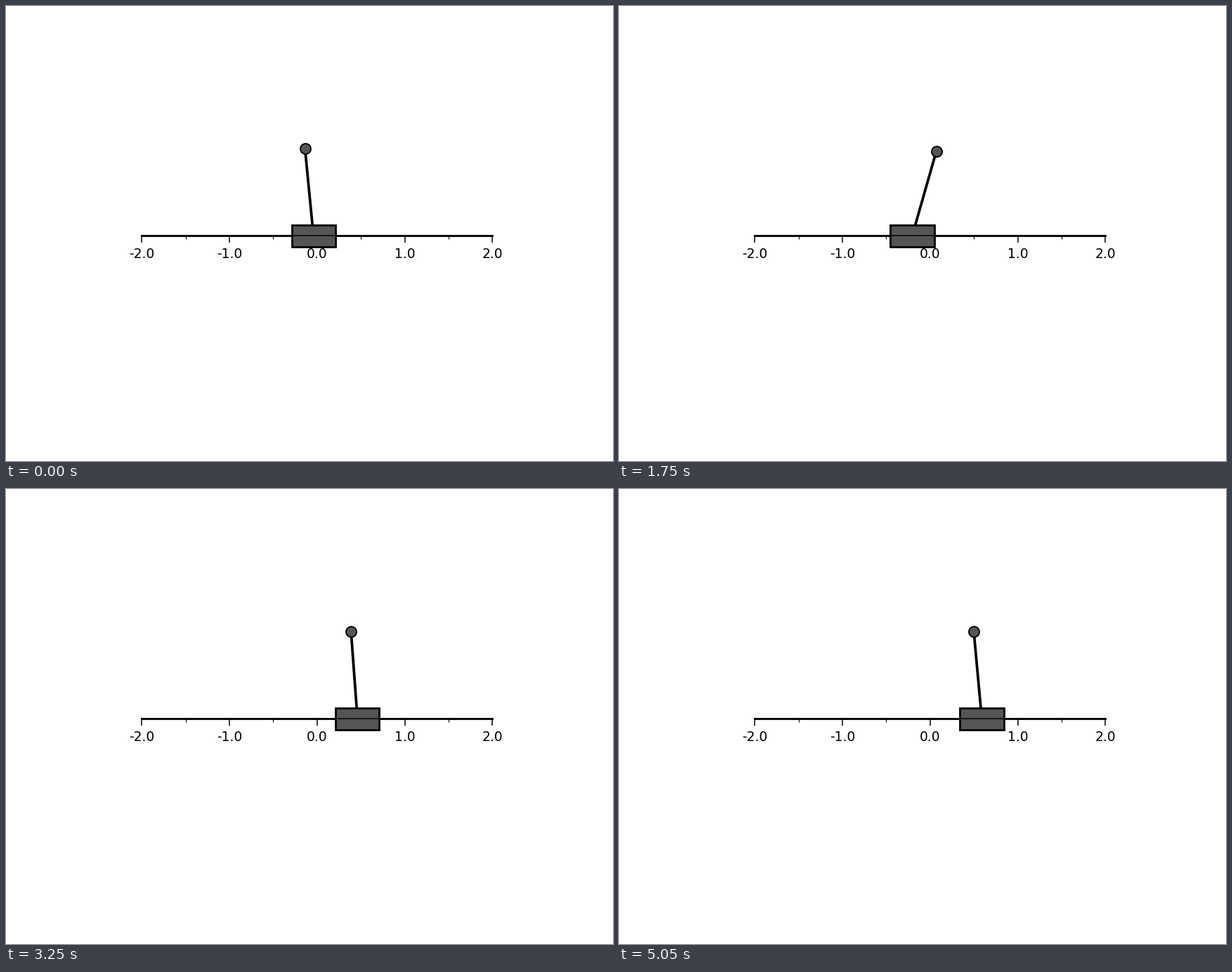
Animation, 864 px wide and 648 px high, one loop 5100 ms. Source, as a matplotlib script:

```python
import numpy as np
import matplotlib.pyplot as plt
from matplotlib.animation import FuncAnimation
from matplotlib.patches import Rectangle
from matplotlib.ticker import MultipleLocator

FRAMES, STEP_MS = 102, 50
CART_W, CART_H = 0.5, 0.25
GREY = "#555555"

# Turning points of the cart: (step, position)
CART = np.array([
    (0, -.041), (4, -.223), (7, -.071), (11, -.191), (14, -.080),
    (17, -.183), (20, -.087), (23, -.191), (26, -.064), (29, -.175),
    (32, .000), (36, -.239), (42, .273), (46, .098), (50, .314),
    (53, .178), (57, .451), (60, .258), (64, .497), (68, .250),
    (72, .483), (76, .278), (80, .521), (84, .274), (89, .519),
    (94, .158), (100, .609), (105, .412),
])

# Slow drift that the bob follows
DRIFT = np.array([
    (0, -.124), (14, -.121), (26, -.086), (43, .153),
    (65, .398), (81, .434), (101, .512),
])
SLOPES = np.gradient(DRIFT[:, 1], DRIFT[:, 0])


def segment(keys, i):
    """Index of the key before step i, span to the next, and progress."""
    k = np.clip(np.searchsorted(keys[:, 0], i, "right") - 1, 0, len(keys) - 2)
    span = keys[k + 1, 0] - keys[k, 0]
    return k, span, (i - keys[k, 0]) / span


def cart_x(i):
    k, _, u = segment(CART, i)
    a, b = CART[k:k + 2, 1]
    return a + (b - a) * (1 - np.cos(np.pi * u)) / 2


def drift_x(i):
    k, span, u = segment(DRIFT, i)
    a, b = DRIFT[k:k + 2, 1]
    ease = u * u * (3 - 2 * u)
    bend = SLOPES[k] * u * (1 - u) ** 2 - SLOPES[k + 1] * u * u * (1 - u)
    return a + (b - a) * ease + span * bend


def pose(i):
    """Cart position and bob coordinates for a pole of unit length."""
    x, mid = cart_x(i), drift_x(i)
    bob = mid - 0.17 * (x - mid)
    return x, bob, np.sqrt(1 - (bob - x) ** 2)


plt.rcParams["font.family"] = "DejaVu Sans"
fig, ax = plt.subplots(figsize=(6.4, 4.8), dpi=135, facecolor="white")
ax.set(xlim=(-2, 2), ylim=(-2, 2), aspect="equal")
ax.set_facecolor("none")
ax.set_axisbelow(True)
ax.spines[["left", "right", "top"]].set_visible(False)
ax.spines["bottom"].set_position(("data", 0))
ax.yaxis.set_visible(False)
ax.xaxis.set_major_locator(MultipleLocator(1))
ax.xaxis.set_minor_locator(MultipleLocator(0.5))
ax.xaxis.set_major_formatter(lambda v, _: f"{v:.1f}")
ax.tick_params(axis="x", length=5.2, width=0.8, pad=3.5, labelsize=10)
ax.tick_params(axis="x", which="minor", length=2.8, width=0.6)

ax.plot([-2, 2], [0, 0], color="black", lw=1.5, zorder=1.5, clip_on=False)
pole, = ax.plot([], [], color="black", lw=2, zorder=2)
cart = Rectangle((0, -CART_H / 2), CART_W, CART_H, facecolor=GREY,
                 edgecolor="black", lw=1.5, zorder=2.2)
ax.add_patch(cart)
ball, = ax.plot([], [], "o", ms=8, mfc=GREY, mec="black", mew=1, zorder=2.3)


def draw(i):
    x, bx, by = pose(i)
    cart.set_x(x - CART_W / 2)
    pole.set_data([x, bx], [0, by])
    ball.set_data([bx], [by])
    return cart, pole, ball


anim = FuncAnimation(fig, draw, frames=FRAMES, interval=STEP_MS,
                     repeat=True, repeat_delay=0)
plt.show()
```
